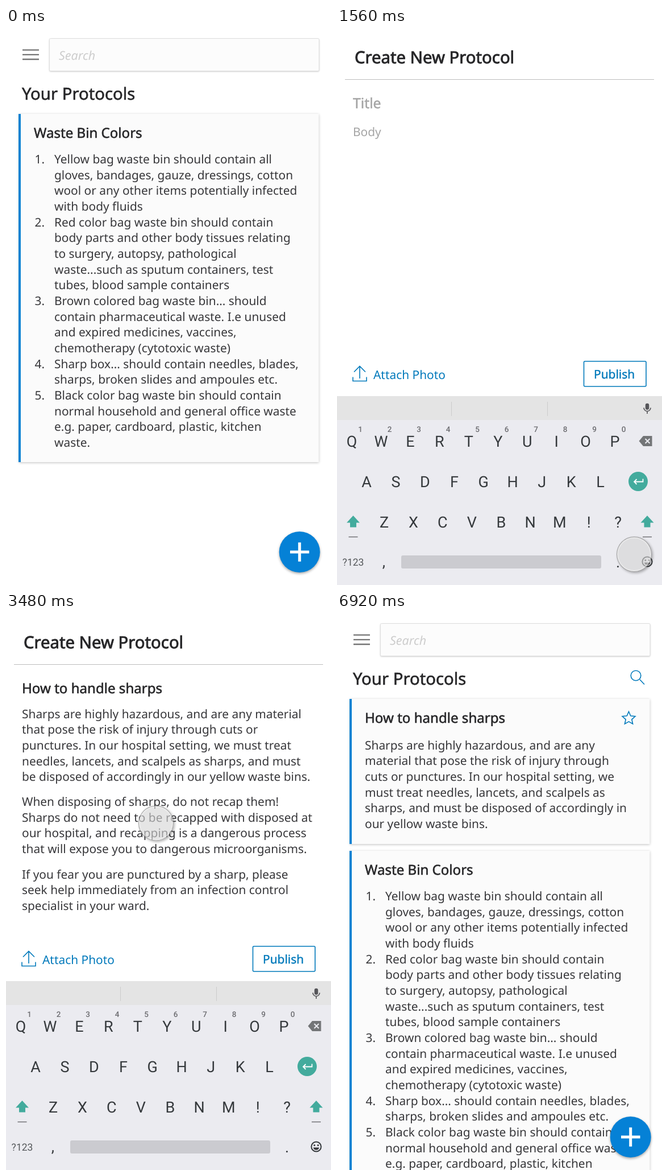
Animation of 572 by 979 pixels, one loop 8040 ms. Source, as an HTML page:

```html
<!DOCTYPE html>
<html lang="en">
<head>
<meta charset="utf-8">
<title>Your Protocols</title>
<style>
html, body { margin: 0; width: 100%; height: 100%; overflow: hidden; background: #fff; }
svg { display: block; width: 572px; height: 979px; font: 20.9px "Noto Sans", "Open Sans", sans-serif; fill: #37373a; text-rendering: geometricPrecision; }
.h1, .h2 { fill: #262628; stroke: #262628; stroke-width: .6px; }
.h1 { font-size: 29.3px; }
.h2 { font-size: 24.1px; }
.strong { stroke-width: .9px; }
.hint { fill: #a5a5a5; }
.blue { fill: #0079bb; }
.line { fill: none; stroke: #0079bb; stroke-width: 1.6; }
.card { fill: #fbfbfb; filter: drop-shadow(0 1px 2px rgba(0,0,0,.25)); }
.key { font: 27px Roboto, sans-serif; fill: #35393c; text-anchor: middle; }
.num { font: 500 13.5px Roboto, sans-serif; fill: #6c6c70; text-anchor: middle; }
.teal { fill: #43ab9d; }
#touch {
  position: absolute; left: -31px; top: -31px; width: 60px; height: 60px; border-radius: 50%;
  border: 1px solid rgba(0,0,0,.3); background: rgba(213,213,213,.62);
  box-shadow: inset 0 0 0 2px rgba(255,255,255,.3);
}
#touch.up { box-shadow: inset 0 0 0 2px rgba(255,255,255,.3), 2px 2px 4px rgba(0,0,0,.3); }
</style>
</head>
<body>
<svg id="stage" viewBox="0 0 572 979"></svg>
<div id="touch"></div>
<script>
const LEAD = 27.67;
const text = (x, y, s, cls = '') => `<text x="${x}" y="${y}" class="${cls}">${s}</text>`;
const lines = (x, y, all) => all.split('|').map((s, i) => text(x, y + i * LEAD, s)).join('');
const card = (y, h) => `<rect class="card" x="23" y="${y}" width="527.5" height="${h}"/>
  <rect x="22" y="${y}" width="4" height="${h}" fill="#0a82d2"/>`;

const rules = [
  'Yellow bag waste bin should contain all|gloves, bandages, gauze, dressings, cotton|wool or any other items potentially infected|with body fluids',
  'Red color bag waste bin should contain|body parts and other body tissues relating|to surgery, autopsy, pathological|waste...such as sputum containers, test|tubes, blood sample containers',
  'Brown colored bag waste bin... should|contain pharmaceutical waste. I.e unused|and expired medicines, vaccines,|chemotherapy (cytotoxic waste)',
  'Sharp box... should contain needles, blades,|sharps, broken slides and ampoules etc.',
  'Black color bag waste bin should contain|normal household and general office waste|e.g. paper, cardboard, plastic, kitchen|waste.'
];

function ruleList() {
  let y = 238;
  return rules.map((rule, i) => {
    const part = text(50.5, y, i + 1 + '.') + lines(85, y, rule);
    y += rule.split('|').length * LEAD;
    return part;
  }).join('');
}

const star = Array.from({ length: 10 }, (_, i) => {
  const a = i * Math.PI / 5, r = i % 2 ? 5.6 : 12;
  return `${513.5 + r * Math.sin(a)},${185.3 - r * Math.cos(a)}`;
}).join(' ');

const home = `<g id="home">
  <path d="M29 38.7H58M29 46.8H58M29 55H58" stroke="#757575" stroke-width="2.3"/>
  <rect x="76.5" y="18.5" width="474.5" height="57" rx="2" fill="#fcfcfc" stroke="#dedede" style="filter:drop-shadow(0 1px 1px rgba(0,0,0,.18))"/>
  <text x="93" y="55.5" font-style="italic" font-size="21.5" fill="#cdcdcd">Search</text>
  ${text(28, 126, 'Your Protocols', 'h1')}
  <g id="added">
    <path class="line" d="M533 117L541 125.5"/><circle class="line" cx="526" cy="110" r="8.8"/>
    ${card(151, 255)}
    ${text(49, 193.3, 'How to handle sharps', 'h2')}
    <polygon class="line" points="${star}"/>
    ${lines(49, 239.5, 'Sharps are highly hazardous, and are any|material that pose the risk of injury through|cuts or punctures. In our hospital setting, we|must treat needles, lancets, and scalpels as|sharps, and must be disposed of accordingly in|our yellow waste bins.')}
  </g>
  <g id="bins">${card(151, 612)}${text(49, 193.3, 'Waste Bin Colors', 'h2')}${ruleList()}</g>
  <circle cx="516.7" cy="921" r="36" fill="#0581d6" style="filter:drop-shadow(0 2px 2px rgba(0,0,0,.35))"/>
  <path d="M500 921H533.5M516.7 904.3V937.7" stroke="#fff" stroke-width="5"/>
</g>`;

const keyRow = (s, x, y) => [...s].map((c, i) => text(x + i * 51.45, y, c, 'key')).join('');
const shift = x => `<path class="teal" d="M${x} 857l11.5 12.5h-6v8h-11v-8h-6z"/>
  <path d="M${x - 8} 894.5h16" stroke="#6a6a6e" stroke-width="1.4"/>`;

const keyboard = `
  <rect y="647" width="572" height="332" fill="#ebebf0"/>
  <rect y="647" width="572" height="42" fill="#e4e4e4"/>
  <path d="M201.5 657V682M370.5 657V682" stroke="#cbcbcb"/>
  <g stroke="#56565a" stroke-width="1.7" fill="none"><rect x="543.6" y="660.6" width="4.8" height="9.5" rx="2.4" fill="#56565a"/>
    <path d="M540 667.5a6 6 0 0 0 12 0M546 673.5V678"/></g>
  ${[...'1234567890'].map((c, i) => text(41 + i * 51.5, 709.5, c, 'num')).join('')}
  ${keyRow('QWERTYUIOP', 26, 735.5)}${keyRow('ASDFGHJKL', 52, 806.5)}${keyRow('ZXCVBNM!?', 83, 877.5)}
  <path d="M531.5 726l7.5-9h15.5v18H539z" fill="#737577"/>
  <path d="M542.5 722l8 8m0-8l-8 8" stroke="#ebebf0" stroke-width="2"/>
  <circle class="teal" cx="530" cy="797" r="17"/>
  <path d="M538.5 792.5v5H523m4.5-4.5l-4.5 4.5 4.5 4.5" fill="none" stroke="#fff" stroke-width="1.8"/>
  ${shift(28.5)}${shift(546)}
  <text x="28.5" y="945" text-anchor="middle" font-family="Roboto, sans-serif" font-size="17.5" fill="#55585b">?123</text>
  ${text(82.5, 947, ',', 'key')}${text(494.5, 947.5, '.', 'key')}
  <rect x="113" y="927" width="352" height="23" rx="3" fill="#cbcbd0"/>
  <circle cx="546" cy="938" r="8.6" fill="none" stroke="#35393c" stroke-width="2"/>
  <circle cx="542.8" cy="935.5" r="1.5"/><circle cx="549.2" cy="935.5" r="1.5"/>
  <path d="M540.8 939.5h10.4a5.3 5.3 0 0 1-10.4 0z"/>`;

const editor = `<g id="editor">
  ${text(31, 62, 'Create New Protocol', 'h1 strong')}
  <path d="M14 90.5H558" stroke="#bdbdbd" stroke-width="1.2"/>
  <g id="empty">
    <text x="28" y="141" font-size="24.8" class="hint" stroke="#a5a5a5" stroke-width=".5">Title</text>
    ${text(28, 190, 'Body', 'hint')}
  </g>
  <g id="filled">
    ${text(28, 141, 'How to handle sharps', 'h2')}
    ${lines(28, 184.5, 'Sharps are highly hazardous, and are any material|that pose the risk of injury through cuts or|punctures. In our hospital setting, we must treat|needles, lancets, and scalpels as sharps, and must|be disposed of accordingly in our yellow waste bins.')}
    ${lines(28, 339, 'When disposing of sharps, do not recap them!|Sharps do not need to be recapped with disposed at|our hospital, and recapping is a dangerous process|that will expose you to dangerous microorganisms.')}
    ${lines(28, 466.5, 'If you fear you are punctured by a sharp, please|seek help immediately from an infection control|specialist in your ward.')}
  </g>
  <path class="line" d="M28 613.5V620.5H52V613.5M40 616V595M30 604.5L40 594.5 50 604.5"/>
  ${text(64, 616.7, 'Attach Photo', 'blue')}
  <rect class="line" x="434.5" y="585.7" width="109.5" height="44.3" rx="2"/>
  <text x="452" y="615.5" class="blue" stroke="#0079bb" stroke-width=".4">Publish</text>
  ${keyboard}
</g>`;

const $ = id => document.getElementById(id);
const show = (id, on) => { $(id).style.display = on ? '' : 'none'; };
$('stage').innerHTML = home + editor;

// start, end, from, to, bend of the path at its control point
const moves = [
  [140, 380, [466, -40], [532, 498], [0, 0]],
  [580, 920, [532, 498], [531, 920], [12, 0]],
  [940, 1060, [531, 920], [523, 925], [0, 14]],
  [1740, 2140, [523, 925], [62, 220], [80, -94]],
  [2320, 2600, [62, 220], [53, 182], [0, 0]],
  [3240, 3960, [53, 182], [487, 606], [22, -16]],
  [6440, 6920, [487, 606], [612, 637], [0, 0]]
];
const taps = [[1160, 1340], [2660, 2840], [4760, 4960]];
const within = (t, [a, b]) => t >= a && t < b;

// cubic easing with control points (x1, 0) and (x2, 1)
function ease(x, x1, x2) {
  let lo = 0, hi = 1, s;
  for (let i = 0; i < 20; i++) {
    s = (lo + hi) / 2;
    if (3 * x1 * s * (1 - s) ** 2 + 3 * x2 * s * s * (1 - s) + s ** 3 < x) lo = s; else hi = s;
  }
  return s * s * (3 - 2 * s);
}

function touchAt(t) {
  const [start, end, from, to, bend] = moves.filter(m => t >= m[0]).pop() || moves[0];
  const x = Math.min(1, Math.max(0, (t - start) / (end - start)));
  const p = start === 1740 ? ease(x, .42, .58) : ease(x, .4, .2);
  return from.map((a, i) => a + (to[i] - a) * p + 2 * p * (1 - p) * bend[i]);
}

function draw(now) {
  const t = now % 8040;
  const editing = within(t, [1340, 4960]), published = t >= 4960;
  show('home', !editing);
  show('editor', editing);
  show('added', published);
  $('bins').setAttribute('transform', `translate(0 ${published ? 267 : 0})`);
  show('empty', t < 2840);
  show('filled', t >= 2840);
  const [x, y] = touchAt(t);
  $('touch').style.transform = `translate(${x}px, ${y}px)`;
  $('touch').className = taps.some(tap => within(t, tap)) ? '' : 'up';
  show('touch', t >= 160 && t < 6920);
}

const began = performance.now();
function tick() {
  draw(performance.now() - began);
  requestAnimationFrame(tick);
}
tick();
</script>
</body>
</html>
```
